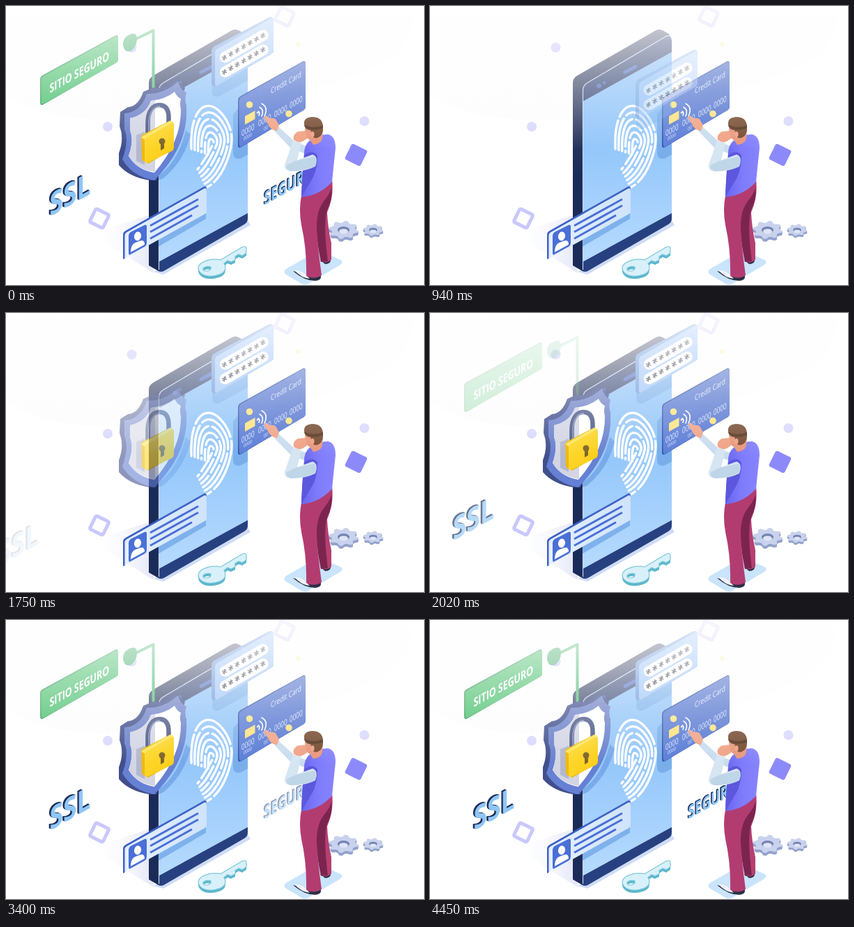
Animation, 600 px wide and 400 px high, one loop 6820 ms. Source, as an HTML page:

```html
<!DOCTYPE html>
<html lang="es">
<head>
<meta charset="utf-8">
<title>Sitio seguro</title>
<style>
  html, body { margin: 0; width: 100%; height: 100%; overflow: hidden; background: #fff; }
  svg { display: block; width: 100vw; height: 100vh; }
  text { font-family: "Open Sans", "Noto Sans", sans-serif; }
  .bold { font-weight: 700; }
</style>
</head>
<body>
<svg viewBox="0 0 600 400" xmlns="http://www.w3.org/2000/svg">
  <defs>
    <linearGradient id="haze" x2="0" y2="1">
      <stop stop-color="#fff" stop-opacity=".8"/>
      <stop offset=".5" stop-color="#fff" stop-opacity=".4"/>
      <stop offset="1" stop-color="#fff" stop-opacity="0"/>
    </linearGradient>
    <linearGradient id="screen" x2="0" y2="1">
      <stop stop-color="#86bdf6"/><stop offset=".5" stop-color="#96c8fb"/><stop offset="1" stop-color="#b9dcff"/>
    </linearGradient>
    <linearGradient id="side" x2="0" y2="1">
      <stop stop-color="#4a5270"/><stop offset=".6" stop-color="#1b2b58"/><stop offset="1" stop-color="#1b2b58"/>
    </linearGradient>
    <linearGradient id="card" x1="1" x2="0" y2="1">
      <stop stop-color="#4d6dc9"/><stop offset="1" stop-color="#5c7fd8"/>
    </linearGradient>
    <linearGradient id="idFill" x2="1" y2="0">
      <stop stop-color="#e6f0fe"/><stop offset="1" stop-color="#cfe3fb"/>
    </linearGradient>
    <linearGradient id="floor" x1="1" x2="0" y2="0">
      <stop stop-color="#e3e6f8"/><stop offset="1" stop-color="#fff" stop-opacity="0"/>
    </linearGradient>
    <linearGradient id="rim" x2="0" y2="1">
      <stop stop-color="#6d80c4"/><stop offset="1" stop-color="#6480d6"/>
    </linearGradient>
    <linearGradient id="gold" x2="1" y2="1">
      <stop stop-color="#ffdc35"/><stop offset="1" stop-color="#fbcb14"/>
    </linearGradient>
    <linearGradient id="vest" x2="1" y2="0">
      <stop stop-color="#6a66ee"/><stop offset=".5" stop-color="#7f7cfc"/><stop offset="1" stop-color="#8784ff"/>
    </linearGradient>
    <clipPath id="glass"><path d="M219 112L347 42V312L219 382Z"/></clipPath>
  </defs>

  <path d="M0 0H586Q584 62 535 84Q440 130 300 150Q90 185 0 128Z" fill="#fdfdfe"/>
  <path d="M205 300L122 327L212 383Z" fill="url(#floor)"/>
  <path d="M212 381L226 385L351 314L346 306Z" fill="#cfdcf6"/>

  <g id="decor">
    <g fill="#d8d9fd">
      <circle cx="180.500" cy="59.500" r="7" fill="#c2c4fb"/>
      <circle cx="146" cy="173" r="7"/>
      <circle cx="514.500" cy="165" r="7"/>
    </g>
    <circle cx="419" cy="55" r="3.500" fill="#fbf5b8"/>
    <rect x="-12.500" y="-12.500" width="25" height="25" rx="3" transform="translate(502.500 213.500) rotate(26)" fill="#8c8afa"/>
    <g fill="none" stroke-width="5">
      <rect x="-10.500" y="-10.500" width="21" height="21" rx="2" transform="translate(134 304.500) rotate(26)" stroke="#c9c8fc"/>
      <rect x="-10.500" y="-10.500" width="21" height="21" rx="2" transform="translate(400 15) rotate(26)" stroke="#d2d1fb"/>
    </g>
  </g>

  <g id="phone">
    <path d="M205 110Q205 104 211 100L324 35Q329 32 334 35L343 40L347 48V305Q347 310 342 313L228 379Q222 383 217 379L205 372Z" fill="url(#side)"/>
    <path d="M219 121Q219 114 226 110L338 44Q347 39 347 50V304Q347 310 342 313L228 379Q219 384 219 376Z" fill="url(#screen)"/>
    <path d="M219 121Q219 114 226 110L338 44Q347 39 347 50V66L219 137Z" fill="#3c4b78"/>
    <path d="M219 367L347 297V304Q347 310 342 313L228 379Q219 384 219 376Z" fill="#27407f"/>
    <path d="M219.500 378V121Q219.500 114 226 110L338 44Q346 40 347 48" fill="none" stroke="#c7d8f5" stroke-width="1.200"/>
    <g fill="#4d6cc4">
      <circle cx="242.500" cy="114.500" r="3.300"/><circle cx="250" cy="110" r="2.200"/>
      <path d="M280 95L295 87" stroke="#4d6cc4" stroke-width="5" stroke-linecap="round"/>
    </g>
    <g clip-path="url(#glass)" fill="#6fa6e6" fill-opacity=".75">
      <path d="M326 155L333 147H347V213L336 219Q326 220 326 211Z"/>
      <path d="M219 330L287 294V305L219 345Z"/>
    </g>
  </g>

  <g id="print" fill="none" stroke="#fff" stroke-width="3.400" stroke-linecap="round"></g>

  <g id="idCard">
    <path d="M168 328Q168 324 172 322L284 259Q288 257 288 262V266L171 330V362L168 363Z" fill="#3d62c4"/>
    <path d="M170.500 329Q170.500 326 174 324L284 262Q288 260 288 264V294Q288 297 284 299L170.500 362Z" fill="url(#idFill)"/>
    <path d="M176 329Q176 326 179 324L199 314Q202 313 202 316V340Q202 343 199 345L179 356Q176 358 176 354Z" fill="#4a6fd6"/>
    <ellipse cx="189" cy="330" rx="5" ry="6.500" fill="#fff" transform="rotate(12 189 330)"/>
    <path d="M179 353Q179 340 189 338Q199 333 199 342Z" fill="#fff"/>
    <path d="M207 315L276 277M207 324L276 286M207 333.500L267 300" stroke="#4a6fd6" stroke-width="3"/>
  </g>

  <g id="bank">
    <path d="M333 136Q333 131 337 129L425 80Q430 77 430 83V144Q430 148 426 150L338 202Q333 205 333 199Z" fill="#2f4da3"/>
    <path d="M334.500 136Q335 132 338 130L425 81.500Q430 79 430 84V144Q430 148 426 150L339 201Q334.500 204 334.500 198Z" fill="url(#card)"/>
    <g fill="#ffe27a">
      <circle cx="349.500" cy="141.500" r="4.800"/><circle cx="406" cy="154.500" r="4.800"/>
      <path d="M343 158L357.500 150V162L343 170Z"/>
    </g>
    <path d="M362 151q3 2 1 6M364 145q7 4 3 13M367 140q10 5 4 18" fill="none" stroke="#fff" stroke-width="1.600" stroke-linecap="round"/>
    <circle cx="361" cy="153" r="1.300" fill="#fff"/>
    <g id="digits" fill="#e4ecff"></g>
  </g>

  <g id="panel">
    <path d="M296 112L296 126Q299 132 307 129L347 107V86Z" fill="#6fa6e6" fill-opacity=".6"/>
    <path d="M295 65Q295 61 299 58L378 16Q381 15 384 18V66L302 114Q297 117 295 111Z" fill="#6a97dd"/>
    <path d="M300 67Q300 63 304 61L380 18Q384 16 384 20V64Q384 67 381 69L303 114Q300 116 300 111Z" fill="#9cc3f7"/>
    <path d="M314.500 73.500L369 42M314.500 94.500L369 63" stroke="#fff" stroke-width="15.500" stroke-linecap="round"/>
    <g id="stars" stroke="#4a4c58" stroke-width="1.500"></g>
  </g>

  <g id="sign">
    <path d="M187 47L211.500 35V122" fill="none" stroke="#4dbb74" stroke-width="4" stroke-linejoin="round"/>
    <path d="M168 56Q167 46 177 41Q188 36 188 47Q188 57 180 64Q170 68 168 56Z" fill="#40ad66"/>
    <path d="M49 105Q49 101 53 99L156 43Q161 40 161 46V76Q161 80 157 82L54 141Q49 144 49 138Z" fill="#2e9552"/>
    <path d="M50.500 106Q50.500 102 55 100L157 44Q161 42 161 47V76Q161 80 157 82L55 139.500Q50.500 142 50.500 137Z" fill="#45be69"/>
    <g id="label" fill="#fff"></g>
  </g>

  <g id="shield">
    <path d="M219 243Q248 222 258 178L265 184Q256 222 226 247L219 250Z" fill="#5f93dc" fill-opacity=".55"/>
    <path d="M164 152L175 145Q190 144 197 123L211 117Q228 120 241 108L248 108L257 117Q253 128 259 143L216 250L206 250Q176 245 162 228V211Q170 190 163 172Z" fill="#414f8c"/>
    <path d="M170 154Q194 152 202 126Q228 126 247 108Q250 120 259 124Q256 133 259 146Q262 200 213 250Q182 245 167 220Q177 192 170 177Z" fill="url(#rim)"/>
    <path d="M178 161Q201 156 208 136Q228 134 242 123Q245 130 251 133Q249 140 251 148Q252 194 213 239Q188 235 176 215Q184 192 178 178Z" fill="#fff"/>
    <path d="M178 161Q201 156 208 136L214 135V238Q188 235 176 215Q184 192 178 178Z" fill="#d3d5e4"/>
    <path d="M187 185L199 180V228L187 222Z" fill="#b3b8d0"/>
    <path d="M203.500 187V168C203.500 150 211 142 220 142C230 142 233.500 149 233.500 160V173" fill="none" stroke="#4a5785" stroke-width="6.500"/>
    <path d="M205 186V168C205.500 151 213 144 221 144" fill="none" stroke="#8391bb" stroke-width="1.800"/>
    <path d="M194 188Q194 185 197 184L236 164L241 169L239 206L204 226L195 221Z" fill="#eeb912"/>
    <path d="M194 188L235 165Q239 164 241 168L200 192Z" fill="#ffe65e"/>
    <path d="M199 193Q199 190 202 188L237 168Q241 166 241 171V202Q241 206 238 208L204 224Q199 226 199 221Z" fill="url(#gold)"/>
    <circle cx="224" cy="194" r="4.500" fill="#7d6425"/>
    <path d="M222 195H227V204L222 207Z" fill="#7d6425"/>
  </g>

  <g id="ssl"></g>
  <g id="segu"></g>

  <g id="keyBase" fill="#5cb6cc" transform="translate(0 4)"></g>
  <g id="keyTop" fill="#d8f0f9" stroke="#7cc8da" stroke-width="1.200"></g>

  <g id="gears"></g>

  <g id="man">
    <path d="M402 377L444 353Q450 350 457 354L480 364Q485 367 480 371L436 397Q430 401 424 398L402 385Q397 381 402 377Z" fill="#c9e4fb"/>
    <path d="M412 380Q422 381 431 388L452 387Q453 393 444 394Q428 394 412 380Z" fill="#2c2f45"/>
    <path d="M414 379Q424 378 431 386L436 391Q424 390 414 379Z" fill="#f1f4fb"/>
    <path d="M451 364L466 362Q467 370 458 370Z" fill="#2c2f45"/>
    <path d="M444 272L468 251Q471 272 461 296Q462 318 467 340V364Q460 370 453 366Q452 330 446 300Z" fill="#b5406f"/>
    <path d="M467 260Q470 276 461 292Q455 312 462 366L452 367Q444 330 445 300Q448 276 467 260Z" fill="#7c2450"/>
    <path d="M424 272L468 249Q470 264 456 280Q445 294 446 320Q448 350 453 386Q442 393 431 387Q432 350 424 314Q420 292 424 272Z" fill="#b23c70"/>
    <path d="M390 172L415 195L438 203L430 212L408 203L386 180Z" fill="#c9dcef"/>
    <path d="M389 179Q383 179 378 173L370 159Q372 156 376 160L381 161Q386 160 388 164L392 171Z" fill="#f0a183"/>
    <path d="M437 192Q450 184 462 184Q473 186 473 204Q470 232 468 252Q450 272 424 274Q425 246 428 220Q426 200 437 192Z" fill="url(#vest)"/>
    <path d="M428 214Q440 205 447 214Q448 236 436 254Q430 264 424 274Q425 240 428 214Z" fill="#5c57dc"/>
    <path d="M412 193L424 196L418 221L440 213Q449 216 444 230Q428 238 409 237Q399 236 400 228Z" fill="#d6e5f2"/>
    <path d="M403 228L416 222L442 216Q448 222 443 230Q424 237 409 237Q401 235 403 228Z" fill="#bfd5e8"/>
    <path d="M413 192Q411 184 419 180L430 179L437 187L426 194Q420 197 413 192Z" fill="#f0a183"/>
    <path d="M429 175Q429 189 437 193L441 199Q452 198 454 190L455 176Z" fill="#e8977b"/>
    <path d="M428 169Q427 160 439 159Q454 159 455 172Q456 186 447 189Q441 191 439 184L437 178Q429 178 428 169Z" fill="#74492f"/>
    <path d="M428 170Q440 177 455 171V175Q441 181 429 174Z" fill="#54341f"/>
    <ellipse cx="440" cy="184" rx="2.600" ry="4" fill="#f0a183"/>
  </g>

  <rect width="600" height="205" fill="url(#haze)" pointer-events="none"/>
</svg>
<script>
const LOOP = 6820, STEP = 30, FADE = 510;
const el = id => document.getElementById(id);
const range = n => Array.from({ length: n }, (_, i) => i);

// Text lying on the upward-right isometric plane.
const iso = (str, x, y, size, sx, attrs = '') =>
  `<text transform="matrix(${sx} ${-0.56 * sx} 0 1 ${x} ${y})" font-size="${size}" ${attrs}>${str}</text>`;

const extruded = (str, x, y, size, sx, depth) =>
  range(depth + 1).map(i => iso(str, x + i * 0.8, y + i * 0.4, size, sx,
    `class="bold" fill="${i < depth ? '#1d2d58' : '#8fc6f6'}"`)).join('');

// One fingerprint ridge: an arch whose right leg sweeps down to the left.
const ridge = r =>
  `M${294 - 0.93 * r} ${214 - 0.3 * r}` +
  `C${294 - r} ${200 - 1.2 * r} ${294 - 0.6 * r} ${198 - 1.83 * r} ${294 - 0.1 * r} ${198 - 1.83 * r}` +
  `S${294 + r} ${196 - 0.9 * r} ${294 + r} ${196 - 0.2 * r}` +
  `S${280 + r} ${220 + r} ${273 + 0.5 * r} ${230 + r}`;

function gear(cx, cy, rx, ry, depth) {
  const teeth = 8;
  const pts = range(teeth * 4).map(i => {
    const a = (i + 0.5) / (teeth * 4) * 2 * Math.PI;
    const k = i % 4 < 2 ? 1 : 0.8;
    return `${(cx + rx * k * Math.cos(a)).toFixed(1)},${(cy + ry * k * Math.sin(a)).toFixed(1)}`;
  }).join(' ');
  const hole = (dy, k, fill) =>
    `<ellipse cx="${cx}" cy="${cy + dy}" rx="${rx * k}" ry="${ry * k * 0.9}" fill="${fill}"/>`;
  return range(depth + 1).map(i =>
    `<polygon points="${pts}" fill="${i < depth ? '#93a2cc' : '#c9d2ed'}" transform="translate(0 ${depth - i})"/>`).join('') +
    hole(0, 0.4, '#7383b2') + hole(2, 0.3, '#dfe5f5');
}

function build() {
  el('print').innerHTML = range(6).map(i => {
    const r = 4 + i * 5.2;
    return `<path d="${ridge(r)}" stroke-dasharray="${30 + i * 9} 6" stroke-dashoffset="${i * 23}"/>`;
  }).join('');

  el('stars').innerHTML = [74, 94.5].map(y => range(7).map(i =>
    `<path d="M0-4V4M-3.500-1L3.500 1M-2.500 3L2.500-3" transform="translate(${313.5 + i * 9.2} ${y - i * 5.3})"/>`
  ).join('')).join('');

  el('digits').innerHTML =
    iso('Credit Card', 380, 126, 11.5, 0.73) +
    [[338, 187], [362, 173], [385, 160], [407, 147]].map(([x, y]) => iso('0000', x, y, 12, 0.68)).join('') +
    iso('0000', 341, 193, 7, 0.75) + iso('00', 370, 179, 7, 0.75);

  el('label').innerHTML = iso('SITIO SEGURO', 62.5, 125, 17.5, 0.71, 'class="bold"');
  el('ssl').innerHTML = extruded('SSL', 60, 301, 45, 0.79, 3);
  el('segu').innerHTML = extruded('SEGURO', 369, 285, 26, 0.68, 2);

  const key = '<path fill-rule="evenodd" d="M308 364L335 348Q344 342 345 347V354L339 358L334 356L329 359V364L323 367L318 365L313 369' +
    'Q319 380 306 385Q291 390 281 384Q271 376 281 368Q294 361 308 364ZM294 374Q287 372 283 376Q282 380 288 380Q295 379 294 374Z"/>';
  el('keyBase').innerHTML = el('keyTop').innerHTML = key;

  el('gears').innerHTML = gear(484.5, 321, 21.5, 13, 4) + gear(527, 321, 14.5, 8.5, 3);
}

function place(id, opacity, dx = 0, dy = 0) {
  el(id).setAttribute('opacity', opacity);
  el(id).setAttribute('transform', `translate(${dx} ${dy})`);
}

const blink = t => t < 2050 ? 0 : t > 4450 ? 1 : Math.abs(1 - 2 * ((t - 2050) % 600) / 600);

function render(ms) {
  let t = ms % LOOP;
  t = t < 100 ? LOOP : Math.floor((t - 10) / STEP) * STEP + 10;
  const fade = start => Math.max(0, Math.min(1, (t - start) / FADE));
  const panel = fade(670), ssl = fade(1690);
  place('panel', panel, 0, 100 * (1 - panel));
  place('shield', fade(1450));
  place('ssl', ssl, -84 * (1 - ssl), 70 * (1 - ssl));
  place('sign', fade(1860));
  place('segu', blink(t));
}

build();
const begin = performance.now();
function tick() {
  render(performance.now() - begin);
  requestAnimationFrame(tick);
}
tick();
</script>
</body>
</html>
```
